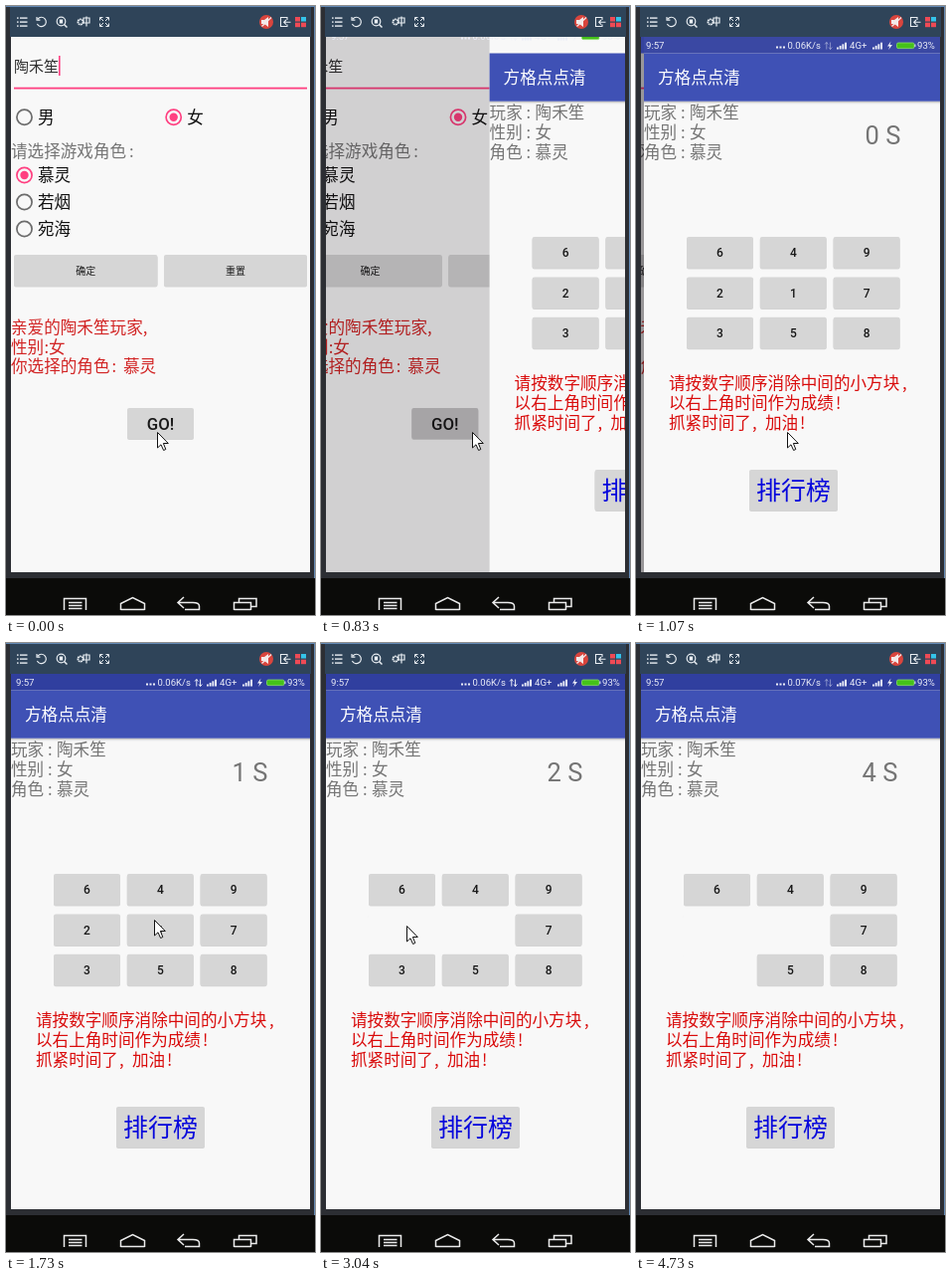
Animation of 311x612 px, one loop 4830 ms. Source, as an HTML page:

```html
<!DOCTYPE html>
<html lang="zh-CN">
<head>
<meta charset="utf-8">
<style>
html, body { margin: 0; width: 100%; height: 100%; overflow: hidden; background: #2c2e33; }
svg { display: block; width: 311px; height: 612px; }
text { font-family: 'Noto Sans CJK SC', 'Noto Sans CJK', sans-serif; white-space: pre; }
.r { font-family: Roboto, sans-serif; }
</style>
</head>
<body>
<svg id="stage" viewBox="0 0 311 612"></svg>
<script>
const LOOP = 4830;
const PINK = '#ff4081', GRAY = '#757575', KEY = '#d6d6d6', HELD = '#c5c3c5';
const PLAYER = '陶禾笙', ROLE = '慕灵', TITLE = '方格点点清';
const DIGITS = [6, 4, 9, 2, 1, 7, 3, 5, 8];

// [time, x, y] of the pointer tip
const POINTER = [
  [0, 152, 428], [1190, 142, 371], [1340, 133, 335], [1460, 139, 295], [1580, 144, 280],
  [1730, 149, 278], [2380, 126, 278], [2530, 108, 280], [2650, 94, 282], [2770, 86, 284],
  [3190, 104, 286], [3310, 165, 286], [3430, 218, 283], [3550, 177, 275], [3670, 136, 303],
  [3790, 111, 334], [3940, 88, 327], [4210, 179, 435], [4360, 262, 594], [4480, 400, 700]
];
// [time, left shift of the incoming page, status bar shift, status tint, dimming]
const SLIDE = [
  [0, 310, -20, 0, 0], [830, 164.6, -9, 0, .16], [950, 24, 0, .78, .34],
  [1070, 3, 0, .95, .4], [1190, 0, 0, 1, .4]
];
const TIMER = [[0, 0], [1730, 1], [2770, 2], [3790, 3], [4730, 4]];
// digit: [pressed from, released at, removed]
const PRESS = { 1: [1980, 2100, true], 2: [2920, 3040, true], 7: [3430, 3670, false], 3: [3940, 4060, true] };

const at = (steps, t) => steps.findLast(s => s[0] <= t);
const rect = (x, y, w, h, fill, more = '') =>
  `<rect x="${x}" y="${y}" width="${w}" height="${h}" fill="${fill}" ${more}/>`;
const text = (x, y, size, fill, str, more = '') =>
  `<text x="${x}" y="${y}" font-size="${size}" fill="${fill}" ${more}>${str}</text>`;
const line = (d, color = '#e8edf2', w = 1.2) =>
  `<path d="${d}" fill="none" stroke="${color}" stroke-width="${w}"/>`;
const ROMAN = 'class="r"', MID = 'text-anchor="middle"';

function button(x, y, w, h, label, size, base, o = {}) {
  return `<g ${o.id ? `id="${o.id}"` : ''}>` +
    rect(x, y + 1, w, h, '#000', 'rx="2" opacity=".15"') +
    rect(x, y, w, h, KEY, 'rx="2" class="face"') +
    text(x + w / 2, base, size, o.color || '#181818', label, `${MID} ${o.more || ''}`) + '</g>';
}

function radio(x, y, label, on) {
  return `<circle cx="${x}" cy="${y}" r="7.6" fill="none" stroke="${on ? PINK : '#6c6c6c'}" stroke-width="1.7"/>` +
    (on ? `<circle cx="${x}" cy="${y}" r="4.2" fill="${PINK}"/>` : '') +
    text(x + 13.5, y + 6.3, 16.6, '#111', label);
}

// "key: value" with the colon and the value set at their own places
const pair = (x, y, fill, key, colonX, valueX, value) =>
  text(x, y, 16.6, fill, `${key}<tspan x="${colonX}">:</tspan><tspan x="${valueX}">${value}</tspan>`);

function toolbar() {
  const c = '#e8edf2', edge = '#6288b4';
  let s = rect(4, 0, 303, 31, '#2f4459') + rect(0, 0, 311, 1, edge) + rect(310, 0, 1, 575, edge);
  for (const y of [12, 16, 20]) s += rect(11, y - .6, 1.6, 1.4, c) + rect(14, y - .6, 7.5, 1.4, c);
  s += line('M32 13A4.7 4.7 0 1 1 31.4 18M31 11V14.2H34.4');
  s += `<circle cx="55.5" cy="15.5" r="4.3" fill="none" stroke="${c}" stroke-width="1.2"/>` +
    rect(53.8, 13.5, 3.4, 4, c) + line('M58.5 18.5L61.5 21.5', c, 1.5);
  s += `<circle cx="75" cy="16" r="2.6" fill="none" stroke="${c}" stroke-width="1.8" stroke-dasharray="1.7 .5"/>` +
    line('M78 12H84V17H78ZM81 10.5V20.5');
  s += line('M94.5 14.5V11.5H97.5M100.5 11.5H103.5V14.5M103.5 17.5V20.5H100.5M97.5 20.5H94.5V17.5' +
    'M95 12L98 15M103 12L100 15M103 20L100 17M95 20L98 17', c, 1);
  s += `<circle cx="262" cy="16" r="7" fill="#d9453d"/>` +
    `<path d="M257 14H260L264 11V21L260 18H257Z" fill="#f3e9e8"/>` + line('M257.5 20.5L267 11.5', '#f3e9e8', 1.3);
  s += line('M283 14V11.5H276.5V20.5H283V18.5M286.5 16.3H280M282 14L279.7 16.3L282 18.6', c, 1.1);
  s += rect(291, 11, 5, 4.5, '#ef4a55') + rect(297, 11, 5, 4.5, '#35c3ea') +
    rect(291, 16.7, 5, 4.5, '#ef4a55') + rect(297, 16.7, 5, 4.5, '#ef4a55');
  return s;
}

function navigation() {
  return rect(0, 575, 311, 37, '#0b0b09') + line(
    'M58.5 607V595.5H80.5V607M63 599.5H76.5M63 602.5H76.5M63 605.5H76.5' +
    'M115.5 607V600.5L127.5 594.5L139.5 600.5V607M115.5 606.5H139.5' +
    'M179 594L173 599.5L179 605M173 599.5H188Q194.5 599.5 194.5 603V606.5H180' +
    'M229.5 607V599.5H246.5V607M229.5 606.5H246.5M234.5 599V595.5H252V603.5H247', '#ececec', 1.5);
}

function form() {
  const red = '#d22525';
  return rect(5, 31, 301, 538, '#f8f8f8') +
    text(8, 66, 15, '#303030', PLAYER) +
    rect(53, 50, 1.6, 20, PINK, 'id="caret"') +
    rect(8, 81.7, 295, 1.8, PINK) +
    radio(18.5, 111.7, '男') + radio(168.7, 111.7, '女', true) +
    text(5, 151.5, 16.6, GRAY, '请选择游戏角色<tspan x="124">:</tspan>') +
    radio(18.5, 170, ROLE, true) + radio(18.5, 197, '若烟') + radio(18.5, 224, '宛海') +
    button(8, 250, 144.5, 31.5, '确定', 10, 269.5) + button(159, 250, 144, 31.5, '重置', 10, 269.5) +
    text(5, 329, 16.6, red, `亲爱的${PLAYER}玩家,`) +
    pair(5, 348.5, red, '性别', 38.5, 43, '女') +
    pair(5, 368, red, '你选择的角色', 106.5, 118, ROLE) +
    button(122, 404, 67, 31, 'GO!', 16.8, 425.5, { id: 'go', more: 'class="r" font-weight="500"' });
}

function game() {
  const red = '#d90b0b';
  const keys = DIGITS.map((d, i) => {
    const y = 232 + Math.floor(i / 3) * 40.4;
    return button(48 + i % 3 * 73.8, y, 67, 31.5, d, 12, y + 20.3,
      { id: 'key' + d, more: 'class="r" font-weight="500"' });
  });
  return rect(5, 31, 301, 538, '#f8f8f8') +
    rect(5, 95.5, 301, 1.5, '#000', 'opacity=".2"') + rect(5, 97, 301, 1.3, '#000', 'opacity=".07"') +
    rect(5, 47.5, 301, 48.2, '#3f51b5') +
    text(19, 78, 16.6, '#fff', TITLE) +
    pair(5, 113, GRAY, '玩家', 42, 51, PLAYER) + pair(5, 133, GRAY, '性别', 42, 51, '女') +
    pair(5, 153, GRAY, '角色', 42, 51, ROLE) +
    text(227.5, 139, 25.5, GRAY, '', `${ROMAN} id="timer"`) +
    keys.join('') +
    text(30, 385, 16.6, red, '请按数字顺序消除中间的小方块<tspan x="265">,</tspan>') +
    text(30, 405, 16.6, red, '以右上角时间作为成绩<tspan x="198">!</tspan>') +
    text(30, 425, 16.6, red, '抓紧时间了<tspan x="114">,</tspan><tspan x="127">加油</tspan><tspan x="162">!</tspan>') +
    button(111, 466, 89, 41, '排行榜', 25, 496.3, { color: '#0808dc' });
}

function status() {
  const c = '#eceef8';
  const bars = x => [0, 1, 2, 3].map(i => rect(x + i * 2.7, 41.5 - i * 1.6, 1.9, 2 + i * 1.6, c)).join('');
  return text(10, 43.3, 9.6, c, '9:57', ROMAN) +
    [141, 144.5, 148].map(x => rect(x, 40.5, 2, 2, c)).join('') +
    text(152.5, 43.3, 9.5, c, '', `${ROMAN} id="speed"`) +
    `<g id="arrows">${line('M191.8 43.5V36.5M190 38.5L191.8 36.5L193.4 38.5M195.6 36.5V43.5M194 41.5L195.6 43.5L197.4 41.5', c, 1)}</g>` +
    bars(202) + text(215, 43.3, 9.6, c, '4G+', ROMAN) + bars(238) +
    `<path d="M256.5 35.5L253 40.5H255.3L254.2 44L258 39H255.5Z" fill="${c}"/>` +
    rect(262.5, 37, 17.5, 5.6, '#45c21a', 'rx="1.5" stroke="#8ade62" stroke-width=".8"') +
    rect(280.4, 38.5, 1, 2.6, c) + text(283, 43.3, 9.6, c, '93%', ROMAN);
}

const stage = document.getElementById('stage');
stage.innerHTML = `<clipPath id="screen"><rect x="5" y="31" width="301" height="538"/></clipPath>` +
  rect(0, 0, 311, 612, '#2c2e33') + toolbar() + navigation() +
  `<g clip-path="url(#screen)">
    <g id="form">${form()}</g>${rect(5, 31, 301, 538, '#0a060a', 'id="dim"')}
    <g id="game">${game()}</g>
    ${rect(5, 31, 301, 16.5, '#303f9f', 'id="tint"')}<g id="status">${status()}</g>
  </g>
  <path id="pointer" d="M.5 .5V16L4 12.8L6.6 18.5L8.8 17.5L6.4 11.5H11.3Z" fill="#fff" stroke="#111"/>`;

const $ = id => document.getElementById(id);
const set = (id, name, value) => $(id).setAttribute(name, value);
const show = (id, on) => set(id, 'visibility', on ? 'visible' : 'hidden');
const move = (id, x, y) => set(id, 'transform', `translate(${x} ${y})`);
const face = (id, held) => $(id).querySelector('.face').setAttribute('fill', held ? HELD : KEY);

function render(t) {
  const [, left, drop, tint, dim] = at(SLIDE, t);
  const [, px, py] = at(POINTER, t);
  move('form', t < 830 ? 0 : -.225 * (301 - left), 0);
  move('game', left, 0);
  move('status', 0, drop);
  move('pointer', px, py);
  set('dim', 'opacity', dim);
  set('tint', 'opacity', tint);
  show('caret', t < 440);
  show('status', t >= 830);
  face('go', t >= 560);
  $('timer').textContent = at(TIMER, t)[1] + ' S';
  $('speed').textContent = t < 3790 ? '0.06K/s' : '0.07K/s';
  set('arrows', 'opacity', t >= 1730 && t < 3790 ? 1 : .45);
  for (const [d, [down, up, gone]] of Object.entries(PRESS)) {
    face('key' + d, t >= down && t < up);
    show('key' + d, !gone || t < up);
  }
}

const start = performance.now();
function tick() {
  render((performance.now() - start) % LOOP);
  requestAnimationFrame(tick);
}
render(0);
requestAnimationFrame(tick);
</script>
</body>
</html>
```
